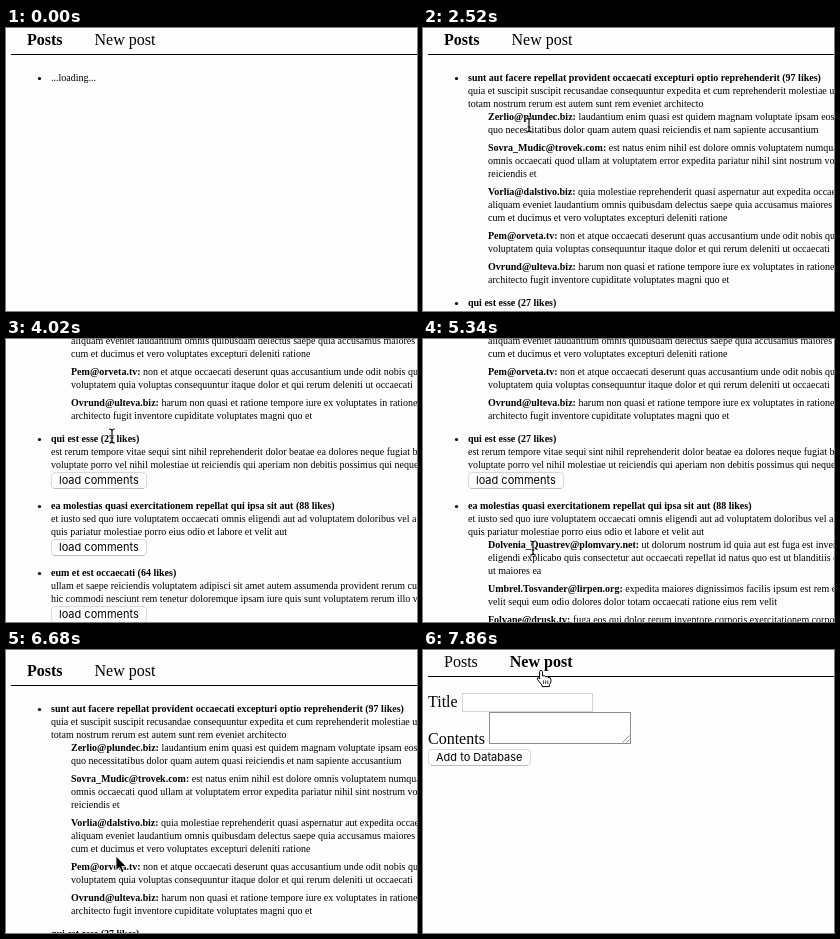
Animation of 411 by 283 pixels, one loop 8 s. Source, as an HTML page:

```html
<!DOCTYPE html>
<html lang="en">
<head>
<meta charset="utf-8">
<title>Posts</title>
<style>
html, body { margin: 0; width: 100%; height: 100%; overflow: hidden; background: #fefefe; }
svg { display: block; width: 100%; height: 100%; }
text { font: 10px "Liberation Serif", "Times New Roman", serif; white-space: pre; }
.big { font-size: 16px; }
.b { font-weight: bold; }
.btn { font: 11px Inter, "Liberation Sans", sans-serif; }
</style>
</head>
<body>
<svg id="stage" viewBox="0 0 411 283"></svg>
<script>
const LOOP = 8000, TICK = 148.4, LINE = 13;

// A comment is [author, ...lines].
const posts = [
  {
    title: 'sunt aut facere repellat provident occaecati excepturi optio reprehenderit (97 likes)',
    body: ['quia et suscipit suscipit recusandae consequuntur expedita et cum reprehenderit molestiae ut ut quas',
      'totam nostrum rerum est autem sunt rem eveniet architecto'],
    opens: 16,
    comments: [
      ['Zerlio@plundec.biz', 'laudantium enim quasi est quidem magnam voluptate ipsam eos tempora',
        'quo necessitatibus dolor quam autem quasi reiciendis et nam sapiente accusantium'],
      ['Sovra_Mudic@trovek.com', 'est natus enim nihil est dolore omnis voluptatem numquam et',
        'omnis occaecati quod ullam at voluptatem error expedita pariatur nihil sint nostrum voluptatem',
        'reiciendis et'],
      ['Vorlia@dalstivo.biz', 'quia molestiae reprehenderit quasi aspernatur aut expedita occaecati',
        'aliquam eveniet laudantium omnis quibusdam delectus saepe quia accusamus maiores nam est',
        'cum et ducimus et vero voluptates excepturi deleniti ratione'],
      ['Pem@orveta.tv', 'non et atque occaecati deserunt quas accusantium unde odit nobis qui',
        'voluptatem quia voluptas consequuntur itaque dolor et qui rerum deleniti ut occaecati'],
      ['Ovrund@ulteva.biz', 'harum non quasi et ratione tempore iure ex voluptates in ratione harum',
        'architecto fugit inventore cupiditate voluptates magni quo et']
    ]
  },
  {
    title: 'qui est esse (27 likes)',
    body: ['est rerum tempore vitae sequi sint nihil reprehenderit dolor beatae ea dolores neque fugiat blanditiis',
      'voluptate porro vel nihil molestiae ut reiciendis qui aperiam non debitis possimus qui neque nisi nulla']
  },
  {
    title: 'ea molestias quasi exercitationem repellat qui ipsa sit aut (88 likes)',
    body: ['et iusto sed quo iure voluptatem occaecati omnis eligendi aut ad voluptatem doloribus vel accusantium',
      'quis pariatur molestiae porro eius odio et labore et velit aut'],
    opens: 35,
    comments: [
      ['Dolvenia_Quastrev@plomvary.net', 'ut dolorum nostrum id quia aut est fuga est inventore vel',
        'eligendi explicabo quis consectetur aut occaecati repellat id natus quo est ut blanditiis quia ut vel',
        'ut maiores ea'],
      ['Umbrel.Tosvander@lirpen.org', 'expedita maiores dignissimos facilis ipsum est rem est fugit',
        'velit sequi eum odio dolores dolor totam occaecati ratione eius rem velit'],
      ['Folvane@drusk.tv', 'fuga eos qui dolor rerum inventore corporis exercitationem corporis cupiditate',
        'et deserunt recusandae est sed quis culpa eum maiores corporis et']
    ]
  },
  {
    title: 'eum et est occaecati (64 likes)',
    body: ['ullam et saepe reiciendis voluptatem adipisci sit amet autem assumenda provident rerum culpa quis',
      'hic commodi nesciunt rem tenetur doloremque ipsam iure quis sunt voluptatem rerum illo velit']
  }
];

// Tracks: [tick, value...]
const scrollTrack = [[22, 0], [23, 54], [24, 100], [25, 137], [26, 162], [27, 175],
  [41, 175], [42, 128], [45, -9], [47, 0]];
const pointerTrack = [[10, 132, 151], [14, 105, 97], [16, 105, 97], [17, 106, 97], [28, 106, 97],
  [30, 108, 131], [34, 110, 209], [44, 110, 209], [45, 110, 206], [46, 110, 206],
  [49, 120, 60], [50, 122, 19], [52, 122, 19], [53, 118, 20]];
const pointerKinds = [[0, ''], [10, 'arrow'], [17, 'beam'], [32, 'arrow'], [36, 'beam'], [44, 'arrow'], [50, 'hand']];

const cursors = {
  arrow: '<path d="M0 0V14.6L3.4 11.5 5.7 16.6 8 15.6 5.8 10.6H10.4Z" fill="#000" stroke="#fff" stroke-width=".9"/>',
  beam: ['#fff" stroke-width="2.4" opacity=".7', '#000" stroke-width="1.1'].map(stroke =>
    `<path d="M-2.8-7Q0-7 0-5Q0-7 2.8-7M0-5V5M-2.8 7Q0 7 0 5Q0 7 2.8 7M-1.5 2H1.5" fill="none" stroke="${stroke}"/>`).join(''),
  hand: `<path d="M-1.4 9V1.6Q-1.2 .3 0 .4Q1.3 .4 1.5 1.7V6Q3.6 5.2 4.4 6.6Q6.4 5.9 7.2 7.4
    Q9.8 7 9.9 9.3V11.6Q9.6 13.4 8.4 14.6V16.6H1V15Q-1.5 12.2-3.6 9.4Q-4-.2 7.6-2.4 7.8Q-1.9 8-1.4 9Z"
    fill="#fff" stroke="#000" stroke-linejoin="round"/><path d="M2.6 10.5V14M4.7 10.5V14M6.8 10.5V14" stroke="#000" stroke-width=".8"/>`
};
cursors.hand = cursors.hand.replace('Q-4-.2 7.6-2.4 7.8', 'Q-4 7.4-2.4 7.8');

const text = (x, y, s, cls = '') => `<text x="${x}" y="${y}" class="${cls}">${s}</text>`;
const box = (x, y, w, h, stroke, rx = 0) =>
  `<rect x="${x + .5}" y="${y + .5}" width="${w - 1}" height="${h - 1}" rx="${rx}" fill="#fff" stroke="${stroke}"/>`;
const button = (x, y, w, label) => box(x, y, w, 17, '#d9d9d9', 3.5) +
  `<path d="M${x + 3} ${y + 16.5}H${x + w - 3}" stroke="#bcbcbc"/>` + text(x + 8, y + 12, label, 'btn');

function at(track, n) {
  const i = track.findIndex(key => key[0] > n);
  if (i < 0) return track.at(-1).slice(1);
  if (i === 0) return track[0].slice(1);
  const a = track[i - 1], b = track[i], p = (n - a[0]) / (b[0] - a[0]);
  return a.slice(1).map((v, k) => Math.round(v + (b[k + 1] - v) * p));
}

function header(onForm) {
  return text(21, 17, 'Posts', onForm ? 'big' : 'big b') +
    text(onForm ? 86.8 : 88.5, 17, 'New post', onForm ? 'big b' : 'big') +
    '<path d="M5 26.5H411" stroke="#000"/>';
}

const bullet = y => `<circle cx="33.5" cy="${y - 2.5}" r="1.6"/>`;

function list(n) {
  let y = 53, out = '';
  for (const post of posts) {
    out += bullet(y) + text(45, y, post.title, 'b');
    post.body.forEach((s, i) => out += text(45, y + LINE * (i + 1), s));
    if (n >= post.opens) {
      y += 3 * LINE;
      for (const [author, ...lines] of post.comments) {
        lines.forEach((s, i) => {
          out += text(65, y, i ? s : `<tspan class="b">${author}:</tspan> ${s}`);
          y += LINE;
        });
        y += 5;
      }
      y += 5;
    } else {
      out += button(45, y + 30, 96, 'load comments');
      y += 67;
    }
  }
  return out;
}

function form() {
  return text(5, 57, 'Title', 'big') + box(39, 43, 131, 19, '#d4d4d4') +
    text(5, 94, 'Contents', 'big') + box(66, 62, 142, 32, '#8c8c8c') +
    '<path d="M199.5 92.5L206.5 85.5M203.5 92.5L206.5 89.5" stroke="#777" stroke-width=".8"/>' +
    button(5, 99, 103, 'Add to Database');
}

function scene(n) {
  const onForm = n >= 51;
  const page = onForm ? form() : n < 7 ? bullet(53) + text(45, 53, '...loading...') : list(n);
  const kind = pointerKinds.findLast(key => key[0] <= n)[1];
  return `<g transform="translate(0 ${-at(scrollTrack, n)[0]})">${header(onForm)}${page}</g>` +
    (kind && `<g transform="translate(${at(pointerTrack, n)})">${cursors[kind]}</g>`);
}

const stage = document.getElementById('stage');
let shown = -1;
function draw() {
  const n = Math.min(53, Math.floor((performance.now() % LOOP + 10) / TICK));
  if (n !== shown) stage.innerHTML = scene(shown = n);
  requestAnimationFrame(draw);
}
draw();
</script>
</body>
</html>
```
